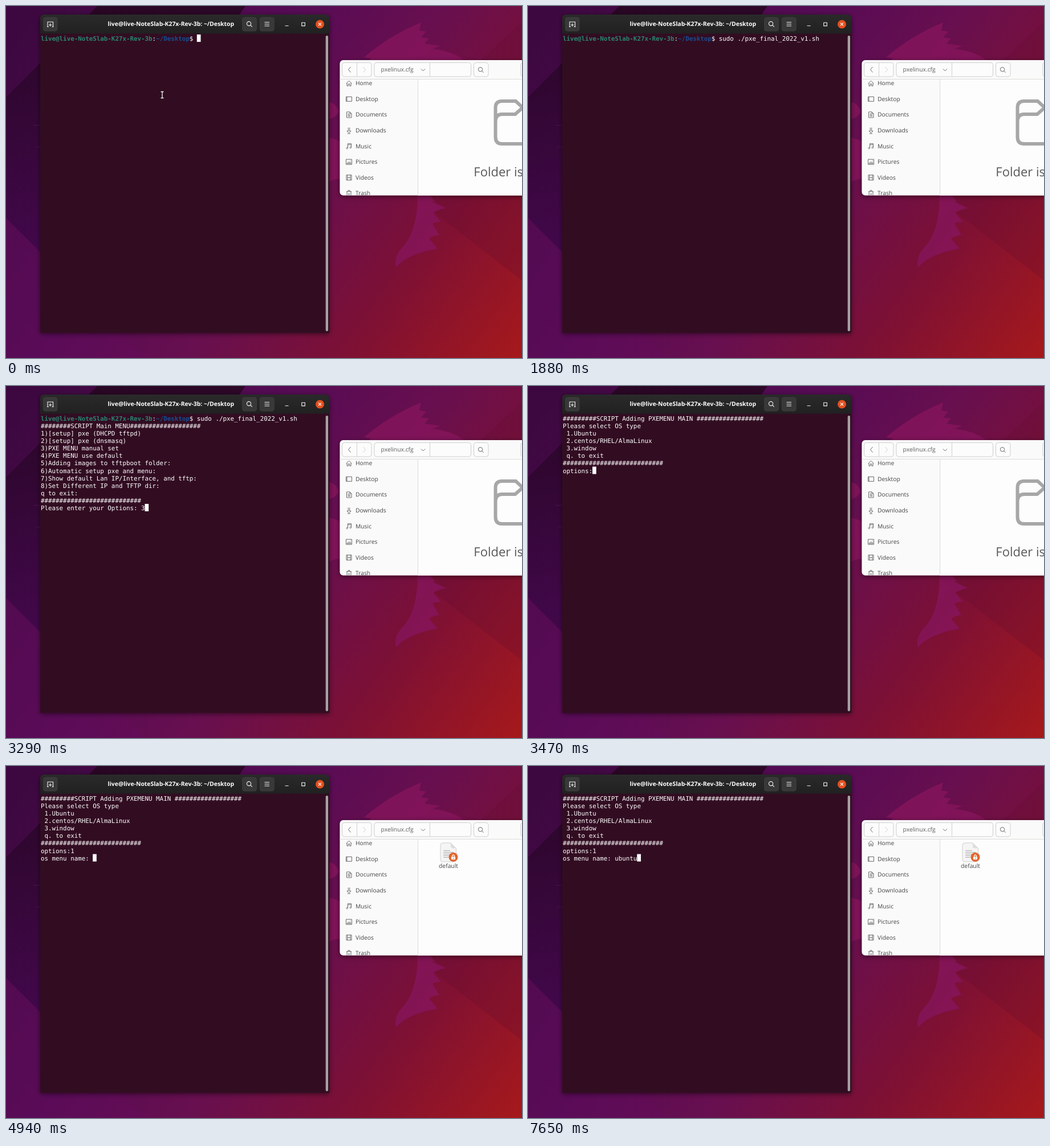
Write an HTML page that moves like this. It is 905 by 618 pixels and loops after 8000 ms.

```html
<!DOCTYPE html>
<html lang="en">
<head>
<meta charset="utf-8">
<title>Terminal session</title>
<style>
html, body { margin: 0; width: 100%; height: 100%; overflow: hidden; background: #4a0a48; }
svg { display: block; width: 905px; height: 618px; }
text { white-space: pre; text-rendering: geometricPrecision; }
.ui text { font: 10.3px "Open Sans", "Noto Sans", sans-serif; fill: #454545; }
.ui .title { font-size: 10.4px; font-weight: 700; fill: #fff; text-anchor: middle; }
.ui .big { font-size: 22px; fill: #585858; }
.ui .mid { text-anchor: middle; }
.term text { font: 10.836px "DejaVu Sans Mono", monospace; fill: #fff; }
.term .bold { font-weight: 700; }
.line { fill: none; stroke: #6a6a6a; stroke-width: 1; }
.box { fill: #fcfcfc; stroke: #d0cfce; stroke-width: 1; }
.tool { fill: #383838; stroke: #414141; stroke-width: .8; }
.glyph { fill: none; stroke: #f4f4f4; stroke-width: 1.1; }
</style>
</head>
<body>
<svg viewBox="0 0 905 618">
  <defs>
    <linearGradient id="sky" gradientUnits="userSpaceOnUse" x1="60" y1="0" x2="905" y2="618">
      <stop offset="0" stop-color="#3d0840"/>
      <stop offset=".35" stop-color="#560b55"/>
      <stop offset=".55" stop-color="#680f4f"/>
      <stop offset=".75" stop-color="#7c1035"/>
      <stop offset="1" stop-color="#a6191b"/>
    </linearGradient>
    <linearGradient id="shade" x1="0" y1="0" x2="0" y2="1">
      <stop offset="0" stop-color="#200618" stop-opacity=".75"/>
      <stop offset="1" stop-color="#3c0650" stop-opacity=".45"/>
    </linearGradient>
    <linearGradient id="bar" x1="0" y1="0" x2="0" y2="1">
      <stop offset="0" stop-color="#2a2a2a"/>
      <stop offset="1" stop-color="#212121"/>
    </linearGradient>
    <filter id="drop" x="-10%" y="-10%" width="120%" height="120%">
      <feDropShadow dx="0" dy="2" stdDeviation="4" flood-color="#000" flood-opacity=".5"/>
    </filter>
    <clipPath id="files"><rect x="585.5" y="95" width="340" height="237.5" rx="6"/></clipPath>
  </defs>

  <rect width="905" height="618" fill="url(#sky)"/>
  <path d="M0 160L160 0H420L60 520V432L0 372Z" fill="url(#shade)"/>
  <path d="M0 372L245 618H0Z" fill="#640d5c" opacity=".35"/>
  <path d="M905 28L722 200V340L905 482Z" fill="#5a0c30" opacity=".22"/>
  <g fill="#86155c" opacity=".8">
    <path d="M728 29Q672 52 628 90L640 92L632 100H808Q790 80 748 75L762 70L734 66L742 57L728 55L737 45L725 43Z"/>
    <path d="M566 168Q580 172 584 186Q578 196 566 199ZM566 231Q580 234 590 240V304Q580 302 566 309Z"/>
    <path d="M722 330H740L753 343H747L772 355Q755 358 749 363L763 379Q752 379 748 382L760 402Q748 404 742 408L757 426Q738 429 725 434Q697 443 684 459Q680 440 694 425Q722 398 722 330Z"/>
  </g>
  <path d="M48 209.5H60M52 247.5H60" stroke="#5c1858" opacity=".6"/>

  <g class="ui">
    <g filter="url(#drop)">
      <path d="M60 574V22Q60 15 67 15H560Q567 15 567 22V574Z" fill="#300a24"/>
    </g>
    <path d="M60 48.5V22Q60 15 67 15H560Q567 15 567 22V48.5Z" fill="url(#bar)"/>
    <rect x="560.7" y="52" width="4.3" height="519" rx="2.1" fill="#a9a2a4"/>
    <rect class="tool" x="65.5" y="20" width="24.5" height="24" rx="4"/>
    <rect class="tool" x="414.5" y="20" width="25" height="24" rx="4"/>
    <rect class="tool" x="445.2" y="20" width="25" height="24" rx="4"/>
    <path class="glyph" d="M73 36.5V28H82.500V36.5M72 36.5H75M80.500 36.5H83.500M77.750 30.500V36M75 33.2H80.500"/>
    <circle class="glyph" cx="426" cy="31" r="3.6"/>
    <path class="glyph" d="M428.700 33.700L431.700 36.700M453.500 28.500H462M453.500 31.800H462M453.500 35H462M489.500 34.700H495.500M518.700 29.300H524.300V34.900H518.700Z"/>
    <circle cx="550.500" cy="32" r="7.500" fill="#e4501f"/>
    <path class="glyph" d="M548 29.500L553 34.500M553 29.500L548 34.500"/>
    <text class="title" x="289.300" y="35.400">live@live-NoteSlab-K27x-Rev-3b: ~/Desktop</text>
  </g>

  <g class="term">
    <text id="prompt" class="bold" x="61" y="61"><tspan fill="#2a8570">live@live-NoteSlab-K27x-Rev-3b</tspan><tspan font-weight="400">:</tspan><tspan fill="#174d93">~/Desktop</tspan><tspan font-weight="400">$</tspan></text>
    <g id="rows"></g>
    <rect id="cursor" width="6.7" height="13" fill="#fff"/>
  </g>
  <path id="mouse" d="M271.500 150.500H276.500M274 150.500V161.500M271.500 161.500H276.500" fill="none" stroke="#fff" stroke-width="1.3" style="filter:drop-shadow(0 0 .8px #000)"/>

  <g class="ui">
    <rect x="585.5" y="95" width="340" height="237.5" rx="6" fill="#fafafa" filter="url(#drop)"/>
    <g clip-path="url(#files)">
      <rect x="722" y="128" width="190" height="206" fill="#fdfdfd"/>
      <path d="M585 128.500H905M722.500 128V333" stroke="#dcdbda"/>
      <rect class="box" x="589.500" y="99.500" width="51.500" height="24.500" rx="4"/>
      <rect class="box" x="646" y="99.500" width="169.500" height="24.500" rx="4"/>
      <rect class="box" x="820.500" y="99.500" width="25.500" height="24.500" rx="4"/>
      <rect class="box" x="903" y="99.500" width="25" height="24.500" rx="4"/>
      <path d="M615.500 100V124M743.500 100V124" stroke="#d0cfce"/>
      <path class="line" d="M604.500 107L600.500 111.700L604.500 116.500M728 110.500L731.500 114L735 110.500M834.700 114L837.700 117"/>
      <circle class="line" cx="832" cy="111.300" r="3.700"/>
      <path class="line" d="M626.500 107L630.500 111.700L626.500 116.500" style="stroke:#d0d0d0"/>
      <text x="657.600" y="115.400" style="fill:#5c5c5c">pxelinux.cfg</text>
      <g id="places"></g>
      <g id="empty">
        <path d="M912 242H870Q858.500 242 858.500 230V178.500Q858.500 167 870 167H894L909 181M858.500 203Q858.500 190 870 190H893L909 176" fill="none" stroke="#a7a7a7" stroke-width="6"/>
        <text class="big" x="820.300" y="299">Folder is</text>
      </g>
      <g id="file">
        <path d="M766 135H780L789.500 144.500V164Q789.500 168 785.500 168H766Q762 168 762 164V139Q762 135 766 135Z" fill="#f5f5f5" stroke="#cecece"/>
        <path d="M780 135V141Q780 144.500 784 144.500H789.500Z" fill="#dedede"/>
        <path d="M767 148.500H779M767 151.500H785M767 154.500H785M767 157.500H783M767 160.500H776" stroke="#a9a9a9"/>
        <circle cx="784.500" cy="160" r="8" fill="#e2652f"/>
        <rect x="781" y="159.300" width="7" height="5" rx="1" fill="#fff"/>
        <path d="M782.500 159.500V158Q784.500 153.700 786.500 158V159.500" fill="none" stroke="#fff" stroke-width="1.200"/>
        <path d="M784.500 161V163" stroke="#e2652f"/>
        <text class="mid" x="776" y="179.300">default</text>
      </g>
    </g>
  </g>
</svg>
<script>
const LOOP = 8000, COL = 6.524, ROW = 13.08, LEFT = 61, TOP = 50;
const el = id => document.getElementById(id);
const hash = n => '#'.repeat(n);
const svg = (tag, attrs, parent, text = '') => {
  const node = document.createElementNS('http://www.w3.org/2000/svg', tag);
  for (const key in attrs) node.setAttribute(key, attrs[key]);
  node.textContent = text;
  return parent.appendChild(node);
};

// Sidebar entries with 11px icons drawn around (0, 0).
const places = [
  ['Home', 'M-5 .5L0 -4.500L5 .5M-3.500 -.5V4.500H-1.200V1H1.200V4.500H3.500V-.5'],
  ['Desktop', 'M-5 -4H5V4H-5ZM-3.500 -4V4'],
  ['Documents', 'M-4 -5H1.500L4.500 -2V5H-4ZM1.500 -5V-2H4.500M-2 -1.500H1M-2 .5H2.500M-2 2.500H2.500'],
  ['Downloads', 'M-1.200 -5V1H-3.500L0 4.500L3.500 1H1.200V-5M-2.500 5.500H2.500'],
  ['Music', 'M-2 3.500V-4.500H4V2.500M-2 -2.500H4M-2 3.500A1.300 1.300 0 1 1 -2 3.400M4 2.500A1.300 1.300 0 1 1 4 2.400'],
  ['Pictures', 'M-5 -4.500H5V4.500H-5ZM-3.500 3L-1 0L.5 1.500L2 0L3.500 3ZM2 -2.500H3'],
  ['Videos', 'M-4.500 -4.500H4.500V4.500H-4.500ZM-2.500 -4.500V4.500M2.500 -4.500V4.500M-2.500 0H2.500'],
  ['Trash', 'M-4.500 -3H4.500M-1.500 -3V-5H1.500V-3M-3.500 -3V5H3.500V-3M-1.500 0L1.500 3M1.500 0L-1.500 3']
];
places.forEach(([name, icon], i) => {
  const y = 135.500 + i * 27.57;
  svg('path', { class: 'line', d: icon, transform: `translate(601.500 ${y + .3})` }, el('places'));
  svg('text', { x: 613, y: y + 3.800 }, el('places'), name);
});

const command = ' '.repeat(42);
const run = command + 'sudo ./pxe_final_2022_v1.sh ';
const menu = [
  run,
  hash(8) + 'SCRIPT Main MENU' + hash(19),
  '1)[setup] pxe (DHCPD tftpd)',
  '2)[setup] pxe (dnsmasq)',
  '3)PXE MENU manual set',
  '4)PXE MENU use default',
  '5)Adding images to tftpboot folder:',
  '6)Automatic setup pxe and menu:',
  '7)Show default Lan IP/Interface, and tftp:',
  '8)Set Different IP and TFTP dir:',
  'q to exit:',
  hash(27),
  'Please enter your Options: '
];
const system = [
  hash(9) + 'SCRIPT Adding PXEMENU MAIN ' + hash(18),
  'Please select OS type',
  ' 1.Ubuntu',
  ' 2.centos/RHEL/AlmaLinux',
  ' 3.window',
  ' q. to exit',
  hash(27),
  'options:'
];
const naming = [...system.slice(0, -1), 'options:1', 'os menu name: '];

// time, screen, typed text, cursor shown
const steps = [
  [0, [command], '', 1], [240, [command], '', 0], [760, [command], '', 1],
  [820, [command], 'clear', 1], [1290, [run], '', 1], [1880, [run], '', 0],
  [2120, menu, '', 1], [2710, menu, '', 0], [3240, menu, '', 1], [3290, menu, '3', 1],
  [3470, system, '', 1], [4000, system, '', 0], [4350, system, '', 1], [4410, system, '1', 1],
  [4940, naming, '', 1], [5530, naming, '', 0], [6120, naming, '', 1], [6710, naming, '', 0],
  [6820, naming, 'u', 1], [7120, naming, 'ub', 1], [7240, naming, 'ubu', 1],
  [7410, naming, 'ubun', 1], [7530, naming, 'ubunt', 1], [7650, naming, 'ubuntu', 1]
];

const rows = menu.map((_, i) => svg('text', { x: LEFT, y: TOP + i * ROW + 11 }, el('rows')));
const show = (id, on) => { el(id).style.display = on ? '' : 'none'; };
let current;

function drawTerminal(step) {
  if (step === current) return;
  current = step;
  const [, screen, typed, blink] = step;
  const last = screen.length - 1;
  rows.forEach((row, i) => {
    row.textContent = (screen[i] || '') + (i === last ? typed : '');
  });
  el('cursor').setAttribute('x', LEFT + (screen[last] + typed).length * COL - .2);
  el('cursor').setAttribute('y', TOP + last * ROW);
  show('cursor', blink);
  show('prompt', screen[0].startsWith(command));
}

const start = performance.now();
function tick() {
  const t = (performance.now() - start) % LOOP;
  drawTerminal(steps.findLast(step => step[0] <= t));
  show('mouse', t < 760);
  show('empty', t < 3530);
  show('file', t >= 3590);
  requestAnimationFrame(tick);
}
tick();
</script>
</body>
</html>
```
